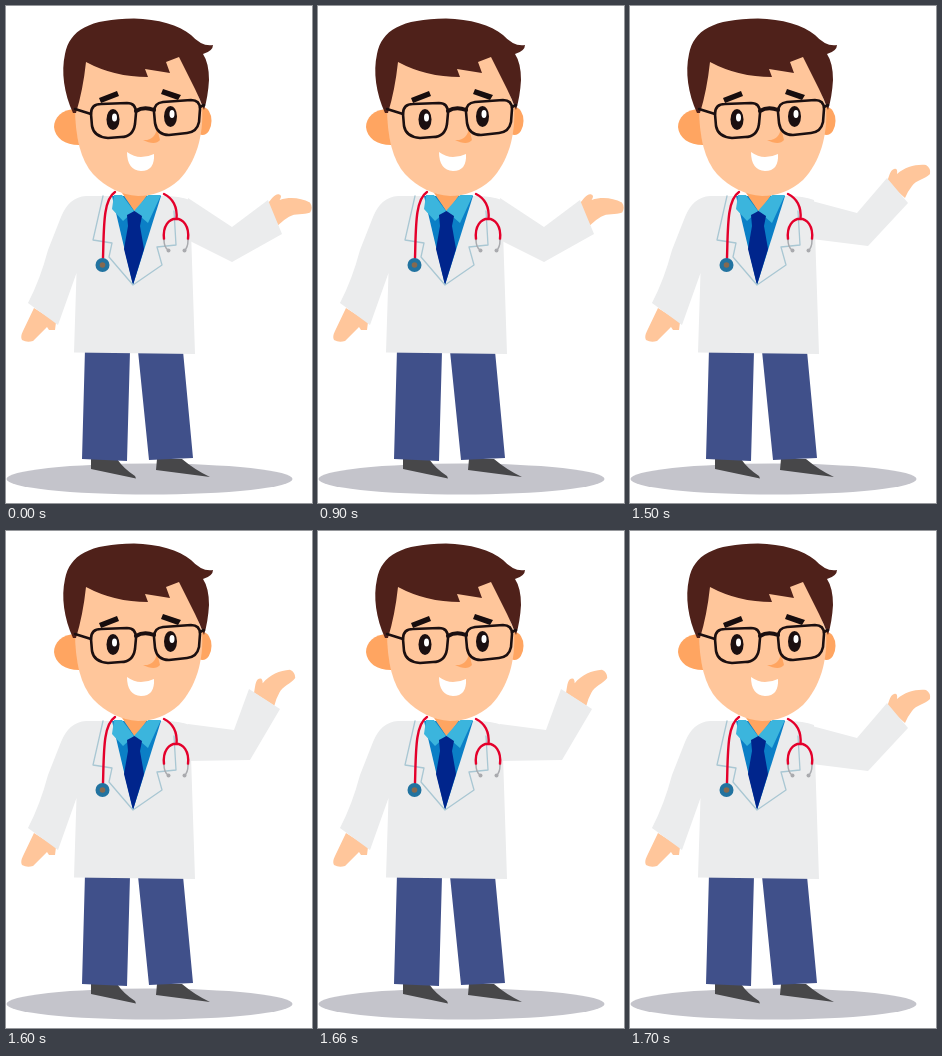
These frames come from a looping animation (306x497 px, 1.8 s). An HTML page:

```html
<!DOCTYPE html>
<html lang="en">
<head>
<meta charset="utf-8">
<title>Waving doctor</title>
<style>
  html, body { margin: 0; width: 100%; height: 100%; overflow: hidden; background: #fff; }
  svg { display: block; width: 306px; height: 497px; }
  .coat { fill: #ebeced; }
  .skin { fill: #ffc69b; }
  .shade { fill: #ffa561; }
  .hair { fill: #4f211a; }
  .trousers { fill: #40508a; }
  .shoe { fill: #474749; }
  .line { fill: none; stroke-linecap: round; stroke-linejoin: round; }
  .seam { stroke: #a9c7d3; stroke-width: 1.3; }
  .tube { stroke: #e4002b; stroke-width: 2.4; }
  .metal { stroke: #a9aaae; stroke-width: 1.5; }
  .frame { stroke: #1b0f10; stroke-width: 2.6; }
</style>
</head>
<body>
<svg viewBox="0 0 306 497">
  <ellipse cx="143.5" cy="473" rx="143" ry="15.5" fill="#c4c4cb"/>

  <!-- Legs -->
  <path class="shoe" d="M85 453H111Q118 463 129 470L130 472.500L85 463ZM151 453H176Q189 464 204 471L150 464Z"/>
  <path class="trousers" d="M79 343L124 345L121 455L76 453ZM132 345H177L187 452L143 454Z"/>

  <!-- Waving arm -->
  <path id="hand" class="skin" d="M257 176C259 171 260 164 264 163Q268 162 267 168C275 161 286 158 296 159Q301 162 300 168C295 173 286 174 282 180Q278 185 275 192Z"/>
  <path id="sleeve" class="coat"/>

  <!-- Resting hand and coat -->
  <path class="skin" d="M28 302L17 325Q14 331 16 334Q21 337 27 335L41 321L43 324L49 324L50 316Z"/>
  <path class="coat" d="M80 190H158Q173 190 184 194L189 348L68 346.500L70.500 267L52 319L22 297Q34 274 42 244L55 211Q63 191 80 190Z"/>

  <!-- Shirt and tie -->
  <path fill="#0b7fc6" d="M106 190H155L127 279Z"/>
  <path class="shade" d="M114 184H145L129 206Z"/>
  <path fill="#3bb5dd" d="M108 189H116L128 205L117 215L106 203ZM142 189H155L142 217L128 205Z"/>
  <path fill="#00258c" d="M121 209L128.500 205L136 210L134 220L138 243L127 279L118 243L122 220Z"/>
  <path class="line seam" d="M97 190L87 234L106 237L103 251L127 279L156 259L151 241L170 239L168 205"/>

  <!-- Stethoscope -->
  <path class="line tube" d="M109 186C97 194 98 221 97 252M158 188Q172 195 170.500 213M158 233C155 206 185 206 182 233"/>
  <path class="line metal" d="M158 234Q158 241 162 244M182 234Q182 242 178 245"/>
  <g fill="#a9aaae">
    <circle cx="162.500" cy="244.500" r="2"/>
    <circle cx="178.500" cy="244.500" r="2"/>
  </g>
  <circle cx="96.500" cy="259" r="7" fill="#2273a0"/>
  <circle cx="96.500" cy="259" r="2.800" fill="#86694f"/>

  <!-- Head -->
  <path class="shade" d="M72 103C57 102 48 111 48 121C49 132 59 139 73 139Z"/>
  <ellipse class="shade" cx="196.500" cy="115" rx="9" ry="14"/>
  <path class="skin" d="M69 100L80 50H178L196 100C198 130 190 156 173 174Q155 190 132 190Q106 188 87 168Q69 148 69 100Z"/>
  <path class="hair" d="M67 107C58 87 55 66 59 48C64 24 83 13 128 12.500C152 13 173 19 185 29Q196 41 207 39Q207 45 197 48Q203 57 203 74Q202 91 198 104Q194 93 189 83L173 51L160 56L164 67L139 63L142 71Q108 71 80 56Q77 84 70 107Z"/>
  <path fill="#170d0e" d="M93 92L111 85L113 90L95 97ZM157 83L175 89L172 94L155 88Z"/>
  <g fill="#1b0f10">
    <ellipse cx="107" cy="113.500" rx="6.500" ry="10.500"/>
    <ellipse cx="164.500" cy="110.500" rx="6.500" ry="10.500"/>
  </g>
  <g fill="#fff">
    <ellipse cx="108.500" cy="111.500" rx="2.500" ry="4"/>
    <ellipse cx="166" cy="108" rx="2.500" ry="4"/>
    <path d="M121 146Q128 151 135 151Q142 151 148 148Q149 165 135 165Q121 164 121 146Z"/>
  </g>
  <path class="shade" d="M151 122L154 134Q149 140 137 134Q149 135 151 122Z"/>
  <g class="line frame">
    <path d="M85 108Q85 98 95 98L121 97Q130 97 130 107L129 118Q127 131 115 131L102 132Q88 131 86 120Z"/>
    <path d="M148 106Q148 97 157 96L185 94Q194 94 194 103L193 116Q191 126 181 127L163 129Q151 129 149 117Z"/>
    <path d="M69 103L85 108M194 101L198 99"/>
    <path d="M130 105Q138 100 148 104" stroke-width="4"/>
  </g>
</svg>
<script>
  const poses = [
    { sleeve: "M182 192L226 221L262 194L276 228L226 256L182 234Z", hand: "translate(1 25) rotate(22 267 183)" },
    { sleeve: "M182 195L227 207L257 172L278 197L238 240L182 233Z", hand: "" },
    { sleeve: "M182 193L228 199L243 158L274 178L244 229L182 230Z", hand: "translate(-8 -16) rotate(-9 267 183)" }
  ];
  const sleeve = document.getElementById("sleeve");
  const hand = document.getElementById("hand");

  // Rest for 1.5 s, then raise the arm in two hard steps and lower it again.
  const poseAt = ms => ms < 1500 ? 0 : ms >= 1600 && ms < 1700 ? 2 : 1;

  let start;
  function draw(now) {
    start ??= now;
    const pose = poses[poseAt((now - start) % 1800)];
    sleeve.setAttribute("d", pose.sleeve);
    hand.setAttribute("transform", pose.hand);
    requestAnimationFrame(draw);
  }
  requestAnimationFrame(draw);
</script>
</body>
</html>
```
